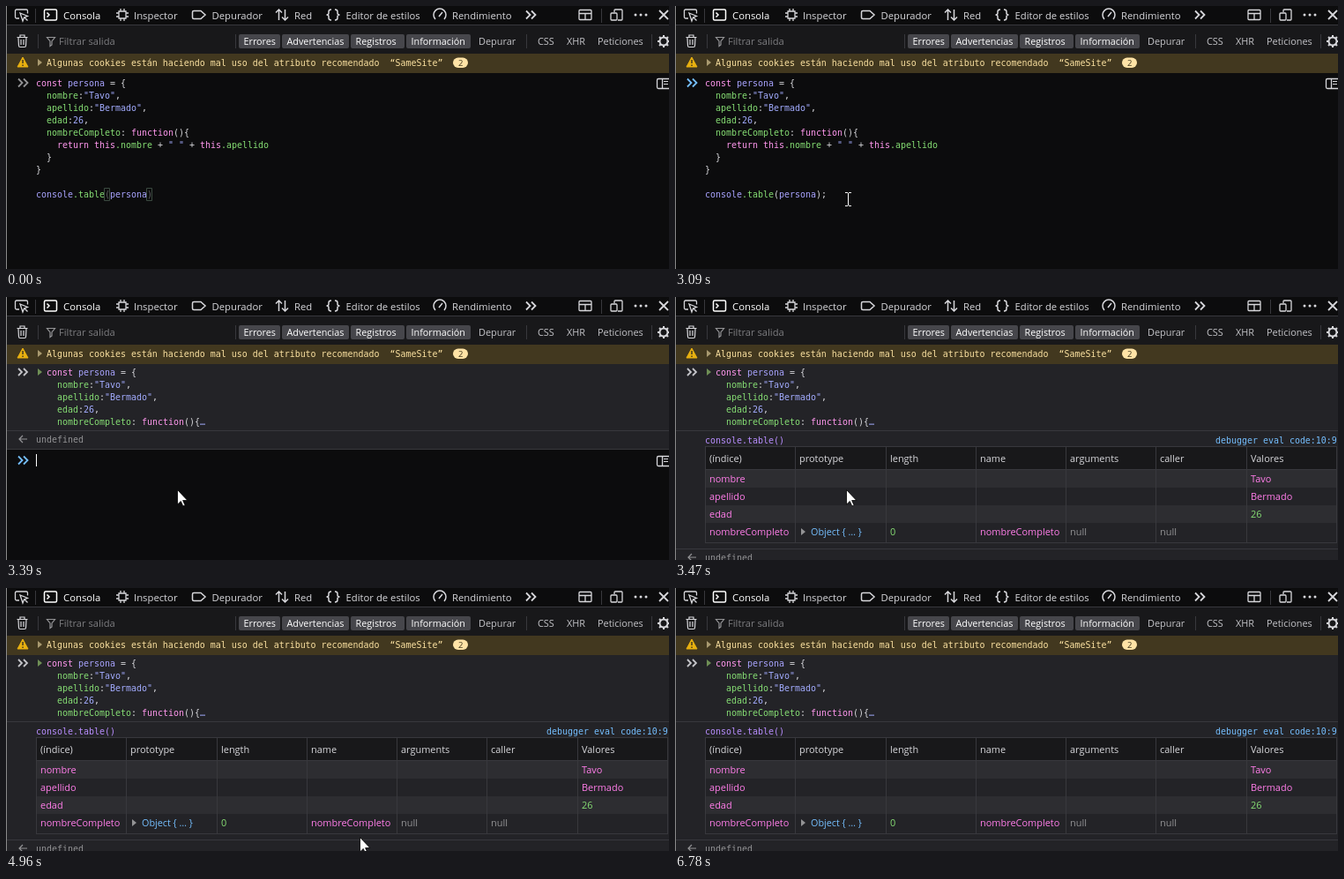
Write an HTML page with a canvas that moves like this. It is 752 px wide and 298 px high and loops after 7470 ms.

```html
<!DOCTYPE html>
<html lang="es">
<head>
<meta charset="utf-8">
<title>Consola</title>
<style>
  html, body { margin: 0; height: 100%; overflow: hidden; background: #0c0c0d; }
  canvas { display: block; }
</style>
</head>
<body>
<canvas id="stage" width="752" height="298"></canvas>
<script>
const ctx = document.getElementById('stage').getContext('2d');
const LOOP = 7470;
const MONO = '9.967px "DejaVu Sans Mono", monospace';
const ui = size => `${size}px "Open Sans", "Noto Sans", sans-serif`;
const PINK = '#ff7de9', GREEN = '#86de74', BLUE = '#75bfff', PURPLE = '#b98eff';
const KEYWORD = '#ff98ee', STRING = '#a3acff', VARIABLE = '#a9a4ff', PLAIN = '#d7d7db', GREY = '#939395';
const LINE = '#38383d', DARK = '#0c0c0d', PANEL = '#232327';

const SOURCE = [
  'const persona = {',
  '  nombre:"Tavo",',
  '  apellido:"Bermado",',
  '  edad:26,',
  '  nombreCompleto: function(){',
  '    return this.nombre + " " + this.apellido',
  '  }',
  '}',
];

function rect(x, y, w, h, color) {
  ctx.fillStyle = color;
  ctx.fillRect(x, y, w, h);
}

function pill(x, y, w, h, r, color) {
  ctx.fillStyle = color;
  ctx.beginPath();
  ctx.roundRect(x, y, w, h, r);
  ctx.fill();
}

function text(str, x, y, color, font = MONO) {
  ctx.font = font;
  ctx.fillStyle = color;
  ctx.fillText(str, x, y);
}

function stroke(d, color = PLAIN, width = 1.3) {
  ctx.strokeStyle = color;
  ctx.lineWidth = width;
  ctx.stroke(new Path2D(d));
}

function fill(d, color) {
  ctx.fillStyle = color;
  ctx.fill(new Path2D(d));
}

// Syntax-coloured line on a 6px character grid
function code(line, x, y) {
  const tokens = /("[^"]*"|\d+|…)|\b(const|function|return|this)\b|(\.\w+|\w+(?=:))|(\w+)|[^\s\w".…]+/g;
  for (const m of line.matchAll(tokens)) {
    const color = m[1] ? STRING : m[2] ? KEYWORD : m[3] ? GREEN : m[4] ? VARIABLE : PLAIN;
    text(m[0], x + m.index * 6, y, color);
  }
}

const chevrons = (x, y, color, s = 4.5) =>
  stroke(`M${x} ${y - s}l${s} ${s}l${-s} ${s}M${x + 6} ${y - s}l${s} ${s}l${-s} ${s}`, color, 1.8);
const twisty = (x, y, color) => fill(`M${x} ${y - 4}l5 4l-5 4z`, color);

function backArrow(y) {
  stroke(`M24 ${y}H15M19 ${y - 4}l-4 4l4 4`, GREY, 1.2);
  text('undefined', 34, y + 4, GREY);
}

function sidebarToggle(y) {
  stroke(`M753 ${y - 5.5}H740q-1.5 0-1.5 1.5v8q0 1.5 1.5 1.5H753M744.5 ${y - 5}v10`);
  stroke(`M746 ${y - 2.5}h5M746 ${y + .5}h5`, PLAIN, 1);
}

function tabBar() {
  rect(0, 0, 752, 22, DARK);
  const tabs = [['Consola', 65], ['Inspector', 145], ['Depurador', 233.5], ['Red', 327],
    ['Editor de estilos', 385.5], ['Rendimiento', 506]];
  tabs.forEach(([label, x], i) => text(label, x, 14.5, i ? PLAIN : '#fff', ui(11.3)));

  stroke('M15 14h-3q-1.5 0-1.5-1.5v-7q0-1.5 1.5-1.5h11q1.5 0 1.5 1.5v3');
  stroke('M16 8l8.5 3.5l-4 1.5l-1.5 4zM21 13l3.5 3.5');
  rect(33, 3, 1, 16, LINE);
  stroke('M45 4h11q1.5 0 1.5 1.5v9q0 1.5-1.5 1.5h-11q-1.5 0-1.5-1.5v-9q0-1.5 1.5-1.5zM46.5 7.5l2.5 2.5l-2.5 2.5', '#fff', 1.5);
  stroke('M128 6h8v8h-8zM130 3v3M134 3v3M130 14v3M134 14v3M125 8h3M125 12h3M136 8h3M136 12h3');
  stroke('M213 5.5h8l5 4.5l-5 4.5h-8q-1.5 0-1.5-1.5v-6q0-1.5 1.5-1.5z', PLAIN, 1.5);
  stroke('M309.5 16V4M306 7.5l3.5-3.5l3.5 3.5M316.5 4v12M313 12.5l3.5 3.5l3.5-3.5', PLAIN, 1.5);
  stroke('M369 4q-3 0-3 2.5v1.5q0 2-2.5 2q2.5 0 2.5 2v1.5q0 2.5 3 2.5M373 4q3 0 3 2.5v1.5q0 2 2.5 2q-2.5 0-2.5 2v1.5q0 2.5-3 2.5', PLAIN, 1.5);
  stroke('M487 15a7 7 0 1 1 10 0M491 12l4-5', PLAIN, 1.5);
  chevrons(590, 10, PLAIN);
  stroke('M651 4.5h12q1 0 1 1v9q0 1-1 1h-12q-1 0-1-1v-9q0-1 1-1zM650 8.5h14M657 8.5v7');
  rect(675, 3, 1, 16, LINE);
  stroke('M690 7v-2q0-1 1-1h7q1 0 1 1v10q0 1-1 1h-4M687 8h5q1 0 1 1v6q0 1-1 1h-5q-1 0-1-1v-6q0-1 1-1z');
  for (const x of [714, 720, 726]) pill(x - 1.5, 8.5, 3, 3, 1.5, PLAIN);
  stroke('M741 5l10 10M751 5l-10 10', PLAIN, 1.8);
}

function filterBar() {
  rect(0, 22, 752, 32, '#18181a');
  rect(0, 21, 752, 1, LINE);
  stroke('M12.5 35.5h12M16 35v-2h5v2M14 36l.5 9q0 1.5 1.5 1.5h5q1.5 0 1.5-1.5l.5-9M17 38v6M20 38v6', PLAIN, 1.2);
  for (const x of [36, 260, 590, 732]) rect(x, 32, 1, 16, LINE);
  stroke('M46.5 35.5h9l-3.5 4.5v4l-2 1.5v-5.5z', GREY, 1.2);
  text('Filtrar salida', 60, 44, '#7d7d80', ui(11.2));

  for (const [label, x, w] of [['Errores', 264, 47], ['Advertencias', 313, 76], ['Registros', 391, 61], ['Información', 454, 73]]) {
    pill(x, 32, w, 16, 2, '#46464b');
    text(label, x + 5.5, 44, '#fff', ui(10.8));
  }
  for (const [label, x] of [['Depurar', 536], ['CSS', 603], ['XHR', 636], ['Peticiones', 671]])
    text(label, x, 44, '#c4c4c8', ui(10.9));
  for (let i = 0; i < 8; i++) {
    const c = Math.cos(i * Math.PI / 4), s = Math.sin(i * Math.PI / 4);
    stroke(`M${746 + 4 * c} ${40 + 4 * s}L${746 + 7 * c} ${40 + 7 * s}`, PLAIN, 2);
  }
  stroke('M741.5 40a4.5 4.5 0 1 1 9 0a4.5 4.5 0 1 1-9 0', PLAIN, 2);
}

function warning() {
  const brown = '#42381f';
  rect(0, 54, 752, 22, brown);
  fill('M19 58l6 11h-12z', '#e8b010');
  stroke('M19 58l6 11h-12z', '#e8b010', 1);
  rect(18.3, 61, 1.5, 4, brown);
  rect(18.3, 66.5, 1.5, 1.5, brown);
  twisty(36, 64, '#a99a70');
  text('Algunas cookies están haciendo mal uso del atributo recomendado  “SameSite”', 46, 68, '#fce2a1');
  pill(507, 58.5, 17, 11.5, 5.75, '#ffe3a6');
  text('2', 513, 68, brown, ui(9.5));
}

function editor(t) {
  const focused = t >= 1525, typed = t >= 2540;
  rect(0, 76, 752, 222, DARK);
  chevrons(14, 87, focused ? BLUE : GREY);
  SOURCE.forEach((line, i) => code(line, 34, 91 + i * 14));
  code('console.table' + (typed ? '(persona);' : ' persona'), 34, 217);
  if (!typed) {
    for (const [bracket, x] of [['(', 112], [')', 160]]) {
      stroke(`M${x - .5} 206.5h6v14h-6z`, '#3b4a40', 1);
      text(bracket, x, 217, '#5c5c60');
    }
  }
  if (focused && t < 2080) rect(166, 206, 1, 14, '#fff');
  if (typed && t < 3090) rect(172, 206, 1, 14, '#fff');
  sidebarToggle(88);
}

function echo() {
  rect(0, 76, 752, 222, PANEL);
  chevrons(14, 85, '#c4c4c8', 4);
  twisty(36, 85, '#6f8f55');
  SOURCE.slice(0, 5).forEach((line, i) =>
    code(line + (i === 4 ? '…' : ''), 46, 89 + i * 14));
  rect(0, 151, 752, 1, LINE);
}

function emptyPrompt() {
  backArrow(161);
  rect(0, 172, 752, 126, DARK);
  rect(0, 172, 752, 1, LINE);
  chevrons(14, 185, BLUE);
  rect(34, 178, 1, 14, '#fff');
  sidebarToggle(186);
}

function table() {
  const columns = [34, 136, 239, 341, 443, 545, 648, 750];
  const cell = (str, col, y, color) => text(str, columns[col] + 5, y, color, ui(10.95));
  text('console.table()', 34, 166, PURPLE);
  text('debugger eval code:10:9', 613, 166, BLUE);
  rect(34, 169, 717, 26, '#18181a');
  for (const y of [196, 236]) rect(34, y, 717, 20, '#2d2d31');
  for (const y of [169, 195, 278]) rect(34, y, 717, 1, LINE);
  for (const x of columns) rect(x, 169, 1, 110, LINE);
  ['(índice)', 'prototype', 'length', 'name', 'arguments', 'caller', 'Valores']
    .forEach((name, i) => cell(name, i, 187, PLAIN));
  [['nombre', 'Tavo'], ['apellido', 'Bermado'], ['edad', '26']].forEach(([key, value], i) => {
    cell(key, 0, 210 + i * 20, PINK);
    cell(value, 6, 210 + i * 20, i === 2 ? GREEN : PINK);
  });
  cell('nombreCompleto', 0, 270, PINK);
  twisty(143, 266, GREY);
  text('Object { … }', 154, 270, BLUE, ui(10.8));
  cell('0', 2, 270, GREEN);
  cell('nombreCompleto', 3, 270, PINK);
  cell('null', 4, 270, GREY);
  cell('null', 5, 270, GREY);
  rect(0, 285, 752, 1, LINE);
  backArrow(295);
}

// Pointer moves: start, end, steps, target x, target y
const MOVES = [
  [220, 840, 9, 201, 220], [1070, 1140, 2, 196, 219],
  [1450, 1451, 1, 202, 222], [1525, 1600, 2, 196, 219],
  [3330, 3331, 1, 194, 218], [4100, 4810, 10, 390, 284],
  [4880, 4960, 2, 401, 282], [5890, 6620, 10, 563, 292],
  [6690, 6691, 1, 580, 294],
];

function pointer(t) {
  if (t < 220 || t >= 6780) return;
  let x = 584, y = 314;
  for (const [start, end, steps, toX, toY] of MOVES) {
    if (t < start) break;
    const step = Math.min(steps, 1 + Math.floor((t - start) / (end - start) * (steps - 1) + 1e-6));
    const p = step / steps;
    const eased = start === 220 ? 1 - (1 - p) ** 1.5 : p * p * (3 - 2 * p);
    x += (toX - x) * eased;
    y += (toY - y) * eased;
  }
  x = Math.round(x);
  y = Math.round(y);
  if (t < 3330) {
    stroke(`M${x - 3} ${y - 7.5}h3M${x + 1} ${y - 7.5}h3M${x - 3} ${y + 7.5}h3M${x + 1} ${y + 7.5}h3M${x + .5} ${y - 7}v14`, '#fff', 1);
  } else {
    const arrow = `M${x + .5} ${y + .5}v16.5l3.8-3.6l2.5 5.5l2.3-1l-2.5-5.4h5.2z`;
    fill(arrow, '#fff');
    stroke(arrow, '#000', .8);
  }
}

function draw() {
  const t = performance.now() % LOOP;
  tabBar();
  filterBar();
  warning();
  if (t < 3330) editor(t);
  else {
    echo();
    if (t < 3470) emptyPrompt();
    else table();
  }
  rect(0, 0, 1, 298, '#8a8a8a');
  pointer(t);
  requestAnimationFrame(draw);
}
draw();
</script>
</body>
</html>
```
